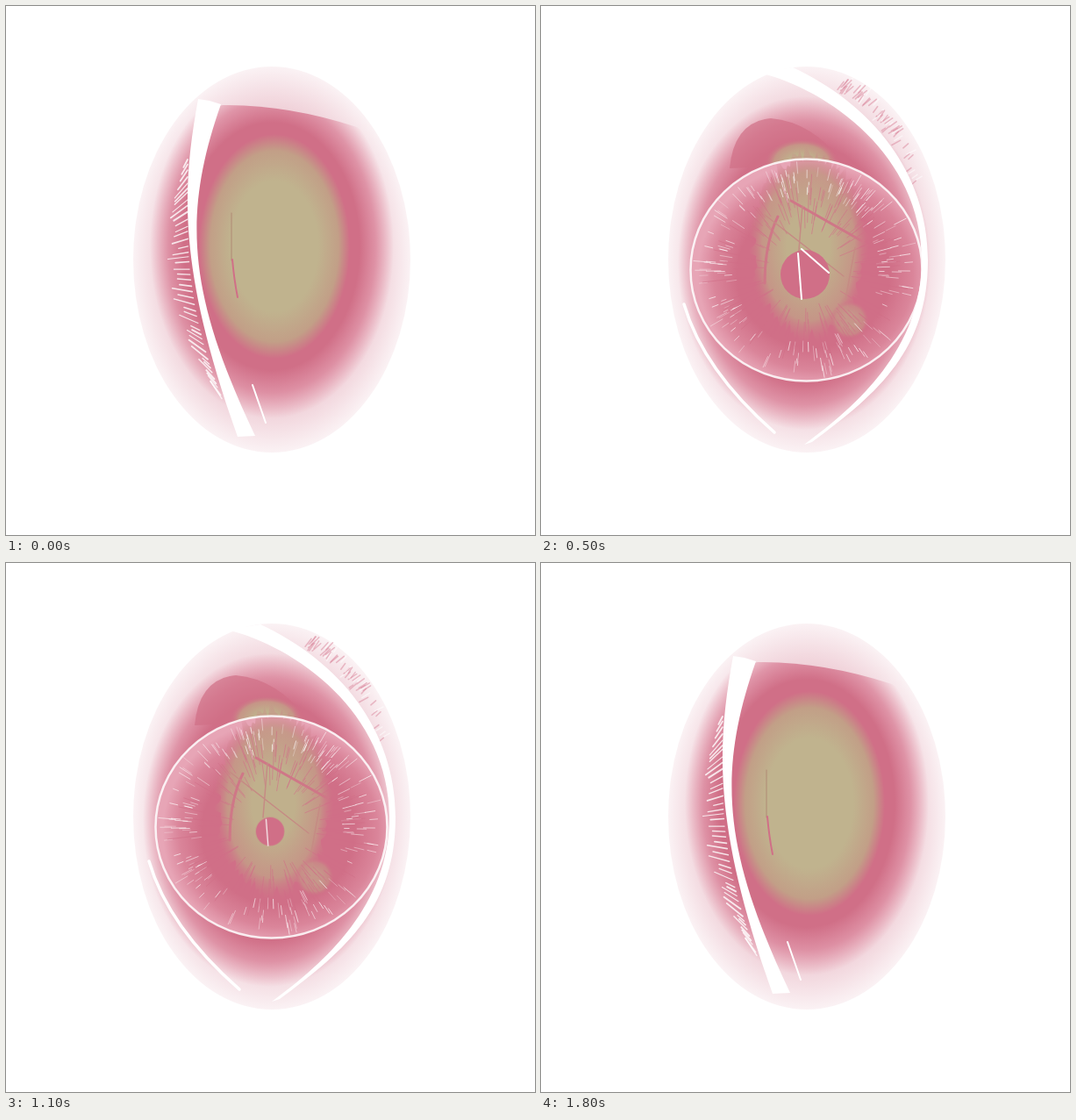
Recreate the animation shown at these times as an HTML page. Size 603x603 px, loop 1.9 s.

```html
<!DOCTYPE html>
<html lang="en">
<head>
<meta charset="utf-8">
<title>Blinking eye</title>
<style>
html, body { margin: 0; width: 100%; height: 100%; overflow: hidden; background: #fff; }
svg { display: block; width: 100vw; height: 100vh; }
line, .line { fill: none; stroke-linecap: round; }
.white { stroke: #fff; }
.pose, #pupil, #glint, #lid { animation: 1.9s step-end infinite; }
#closed { animation-name: closed; }
#narrow { animation-name: narrow; }
#half { animation-name: half; }
#open { animation-name: open; }
#pupil { animation-name: pupil; }
#glint { animation-name: glint; }
#lid { animation-name: lid; }
@keyframes closed { 0%, 84.21% { visibility: visible } 21.05% { visibility: hidden } }
@keyframes half { 0%, 26.31%, 78.94% { visibility: hidden } 21.05%, 73.68% { visibility: visible } }
@keyframes open { 0%, 73.68% { visibility: hidden } 26.31% { visibility: visible } }
@keyframes narrow { 0%, 84.21% { visibility: hidden } 78.94% { visibility: visible } }
@keyframes pupil {
  0% { transform: translate(301px, 306px) scale(1) }
  31.57% { transform: translate(301px, 306px) scale(.88) }
  36.84% { transform: translate(301px, 306px) scale(.75) }
  42.1% { transform: translate(301px, 306px) scale(.65) }
  47.36%, 100% { transform: translate(301px, 306px) scale(.58) }
}
@keyframes glint { 0% { opacity: 1 } 36.84%, 100% { opacity: 0 } }
@keyframes lid { 0% { transform: translateX(-3px) } 31.57%, 100% { transform: none } }
</style>
</head>
<body>
<svg viewBox="0 0 603 603">
  <defs>
    <radialGradient id="haze">
      <stop offset=".6" stop-color="#d06f87" stop-opacity=".5"/>
      <stop offset=".82" stop-color="#d06f87" stop-opacity=".28"/>
      <stop offset="1" stop-color="#d06f87" stop-opacity=".09"/>
    </radialGradient>
    <radialGradient id="rose">
      <stop offset=".72" stop-color="#d06f87"/>
      <stop offset=".85" stop-color="#d87b93" stop-opacity=".72"/>
      <stop offset="1" stop-color="#de8299" stop-opacity="0"/>
    </radialGradient>
    <radialGradient id="sand">
      <stop offset=".58" stop-color="#c0b38e"/>
      <stop offset=".85" stop-color="#c29f87"/>
      <stop offset="1" stop-color="#d06f87"/>
    </radialGradient>
    <radialGradient id="patch">
      <stop offset=".35" stop-color="#c0b08c"/>
      <stop offset=".75" stop-color="#c49a87" stop-opacity=".9"/>
      <stop offset="1" stop-color="#d06f87" stop-opacity="0"/>
    </radialGradient>
    <radialGradient id="ring" cx=".53" cy=".52">
      <stop offset=".66" stop-color="#d06f87"/>
      <stop offset=".86" stop-color="#da859a"/>
      <stop offset="1" stop-color="#e7a5b6"/>
    </radialGradient>
    <clipPath id="brow"><path d="M140 190L222 118 247 113Q320 112 400 138L470 190V520H140Z"/></clipPath>
    <clipPath id="narrowSide"><path d="M250 60Q238 260 272 430L290 520H500V60Z"/></clipPath>
    <clipPath id="skinSide"><path d="M262 60Q350 280 296 510H500V60Z"/></clipPath>
    <clipPath id="eyeSide"><path d="M262 60Q350 280 296 510H100V60Z"/></clipPath>
    <ellipse id="outer" cx="303" cy="289" rx="158" ry="220" fill="url(#haze)"/>
    <g id="flesh" clip-path="url(#brow)"><ellipse cx="303" cy="274" rx="139" ry="196" fill="url(#rose)"/></g>
    <ellipse id="tan" cx="306" cy="274" rx="86" ry="128" fill="url(#sand)"/>
    <g id="ball">
      <ellipse cx="300" cy="293" rx="144" ry="190" fill="url(#rose)"/>
      <path d="M215 185Q220 132 262 128 310 132 345 180Z" fill="#d06f87" opacity=".7"/>
      <ellipse cx="297" cy="179" rx="42" ry="28" fill="url(#patch)"/>
      <ellipse cx="302.5" cy="301" rx="132" ry="126.5" fill="url(#ring)"/>
      <path id="blob" fill="url(#patch)"/>
      <ellipse cx="352" cy="358" rx="22" ry="22" fill="url(#patch)" opacity=".6"/>
      <g id="fibres"/>
      <path class="line" stroke="#cf7787" stroke-width="3" d="M285 222L366 268M270 240Q255 270 255 316"/>
      <path class="line" stroke="#c58b84" stroke-width="1.5" d="M255 238L345 308M298 228L293 290M358 275L347 335"/>
      <ellipse cx="302.5" cy="301" rx="132" ry="126.5" class="line white" stroke-width="2.5" opacity=".85"/>
    </g>
  </defs>

  <use href="#outer"/>

  <g id="closed" class="pose">
    <use href="#flesh"/>
    <use href="#tan"/>
    <g id="lashes"/>
    <path fill="#fff" d="M219 106C200 210 196 300 264 491L284 490C208 330 200 240 245 112L232 108Z"/>
    <path class="line" stroke="#b08a74" d="M257 236V290"/>
    <path class="line" stroke="#d06f87" stroke-width="2" d="M258 289Q260 312 264 332"/>
    <path class="line white" stroke-width="2" d="M281 432L296 475"/>
  </g>

  <g id="narrow" class="pose">
    <use href="#flesh"/>
    <g clip-path="url(#narrowSide)"><use href="#tan"/></g>
    <g id="creases"/>
    <path fill="#fff" d="M229 106Q219 270 262 435L270 495 292 492Q226 300 238 170L250 90Z" opacity=".5"/>
    <path class="line white" stroke-width="4" d="M246 92C230 190 226 300 284 488"/>
    <path class="line" stroke="#f0c2cd" stroke-width="2" d="M249 180C243 250 252 320 263 370"/>
    <path class="line white" stroke-width="3" opacity=".8" d="M230 108C210 155 203 190 204 235 206 320 226 395 248 425L280 490"/>
    <path class="line white" stroke-width="2" opacity=".7" d="M205 160C180 245 196 370 250 455M230 180C227 260 236 360 254 418M206 214L230 180M205 218L226 203M236 410L262 428M271 108V137M296 425L305 468"/>
    <path class="line" stroke="#c17a78" stroke-width="1.5" d="M277 255Q278 290 283 317"/>
  </g>

  <g id="half" class="pose">
    <g clip-path="url(#eyeSide)"><use href="#ball"/></g>
    <g clip-path="url(#skinSide)"><use href="#flesh"/><use href="#tan"/></g>
    <path class="line white" stroke-width="9" d="M264 72Q348 280 297 500"/>
  </g>

  <g id="open" class="pose">
    <use href="#ball"/>
    <g id="pupil">
      <circle r="28" fill="#d06f87"/>
      <path class="line white" stroke-width="2" d="M-8 -24L-4 28"/>
      <path id="glint" class="line white" stroke-width="2" d="M-4 -29L27 -2"/>
    </g>
    <g id="lid">
      <g id="fringe"/>
      <path fill="#fff" d="M252 76C330 95 437 170 437 290 437 390 364 455 303 500L312 497C390 440 444 390 444 290 444 190 380 112 290 70Z"/>
    </g>
    <path class="line white" stroke-width="3.5" d="M163 340Q185 415 266 486"/>
  </g>
</svg>
<script>
const $ = id => document.getElementById(id);
let seed = 7;
const rnd = () => (seed = seed * 16807 % 2147483647) / 2147483647;
const NS = 'http://www.w3.org/2000/svg';

function line(parent, x, y, dx, dy, width, opacity = 1, color = '#fff') {
  const el = document.createElementNS(NS, 'line');
  const attrs = { x1: x, y1: y, x2: x + dx, y2: y + dy, stroke: color, 'stroke-width': width, opacity };
  for (const k in attrs) el.setAttribute(k, attrs[k]);
  $(parent).append(el);
}

// Lashes lean towards the middle of the closed lid.
for (let y = 175; y < 455; y += 4 + rnd() * 5) {
  const x = 207 + (y < 255 ? 0 : (y - 255) ** 2 / 950);
  const len = 10 + rnd() * 15;
  const a = y < 300 ? (300 - y) / 115 : (300 - y) / 150;
  line('lashes', x, y, -len * Math.cos(a), len * Math.sin(a), 1 + rnd(), .8);
}

// Fine streaks following the curve of the nearly closed lid.
for (let i = 0; i < 170; i++) {
  const y = 135 + rnd() * 305, len = 8 + rnd() * 18;
  const x = 184 + (y - 245) ** 2 / 900 + rnd() * 46;
  line('creases', x, y, len * (y - 245) / 450, len, 1.2, .3 + rnd() * .4);
}
for (let i = 0; i < 9; i++) line('creases', 207 + i, 206 - i * 7, 20 - i, -24, 1.5, .7);

// Ragged inner patch of the iris.
let d = '';
for (let i = 0; i < 150; i++) {
  const a = i / 150 * 2 * Math.PI, k = .88 + rnd() * .18;
  d += (i ? 'L' : 'M') + (305 + 68 * k * Math.cos(a)).toFixed(1) + ' ' + (273 + 108 * k * Math.sin(a)).toFixed(1);
}
$('blob').setAttribute('d', d + 'Z');

// Radial fibres: pale at the rim, rosy over the patch.
function fibre(r1, r2, width, opacity, color) {
  const a = rnd() * 2 * Math.PI, c = Math.cos(a), s = Math.sin(a);
  line('fibres', 302 + r1 * c, 301 + r1 * s, (r2 - r1) * c, (r2 - r1) * s, width, opacity, color);
}
for (let i = 0; i < 190; i++) {
  const r = 80 + rnd() * 34;
  fibre(r, r + 5 + rnd() * 12, 1, .25 + rnd() * .45, '#fff');
}
for (let i = 0; i < 150; i++) {
  const r = 40 + rnd() * 45;
  fibre(r, r + 12 + rnd() * 24, 1, .6, '#d06f87');
}

// Lashes outside the open lid.
for (let i = 0; i < 60; i++) {
  const t = rnd(), off = rnd() * 10;
  line('fringe', 338 + 86 * t + off, 98 + 20 * t + 88 * t * t - off, 4 + 6 * rnd(), -9 + 5 * t,
    1.5, .5, i % 3 ? '#d9849a' : '#fff');
}
</script>
</body>
</html>
```
